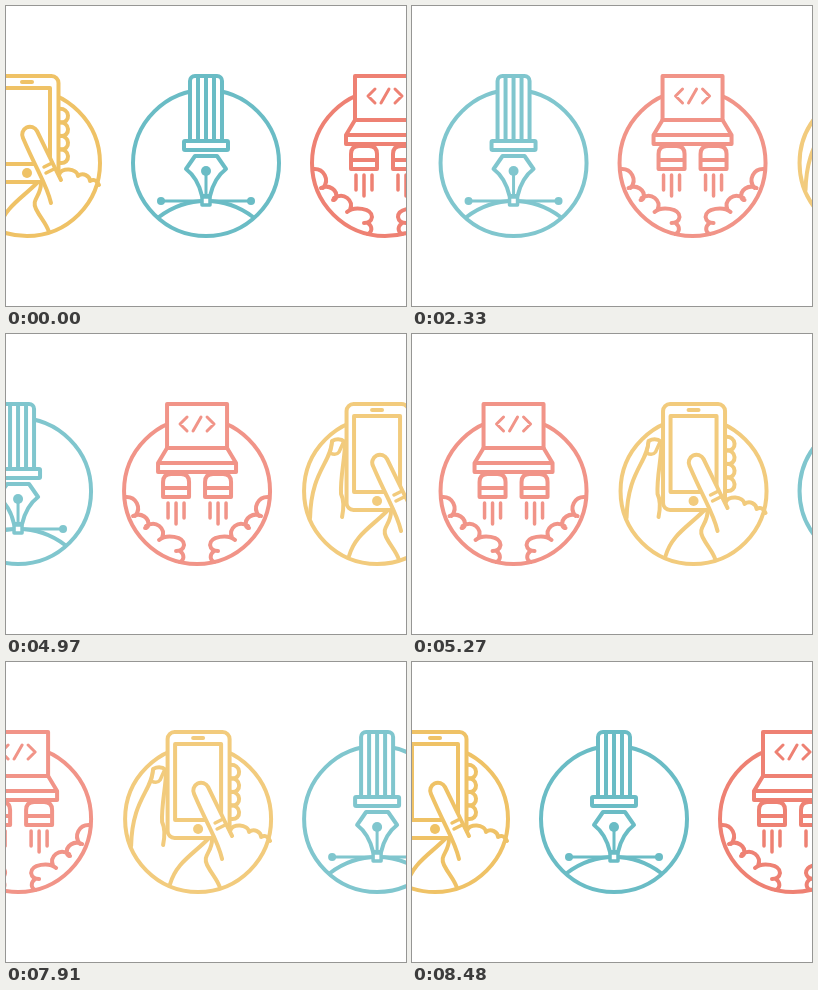
An HTML page with a canvas that plays this animation: 400x300 px, repeating every 8.81 s.

```html
<!DOCTYPE html>
<html>
<head>
<meta charset="utf-8">
<title>Icon carousel</title>
<style>
html, body { margin: 0; width: 100%; height: 100%; overflow: hidden; background: #fff; }
canvas { display: block; width: 400px; height: 300px; }
</style>
</head>
<body>
<canvas id="stage" width="400" height="300"></canvas>
<script>
const ctx = document.getElementById('stage').getContext('2d');
const YELLOW = '#efc266', BLUE = '#6abcc5', RED = '#ee8173';
const LOOP = 8810, FRAME = 30, STEPS = 20, FADE = 0.85;

// Icon coordinates are relative to the centre of the ring.
function line(d, width = 4, fill) {
  const path = new Path2D(d);
  if (fill) { ctx.fillStyle = '#fff'; ctx.fill(path); }
  ctx.lineWidth = width;
  ctx.stroke(path);
}

function box(x, y, w, h, r = 0) {
  ctx.beginPath();
  ctx.roundRect(x, y, w, h, r);
  ctx.fillStyle = '#fff';
  ctx.fill();
  ctx.lineWidth = 4;
  ctx.stroke();
}

function dot(x, y, r) {
  ctx.beginPath();
  ctx.arc(x, y, r, 0, Math.PI * 2);
  ctx.fillStyle = ctx.strokeStyle;
  ctx.fill();
}

function ring() {
  ctx.beginPath();
  ctx.arc(0, 0, 73, 0, Math.PI * 2);
  ctx.lineWidth = 4;
  ctx.stroke();
}

function mirrored(draw) {
  draw();
  ctx.save();
  ctx.scale(-1, 1);
  draw();
  ctx.restore();
}

function pen() {
  box(-16, -87, 32, 67, [5, 5, 0, 0]);
  line('M-8-87V-22M0-87V-22M8-87V-22');
  box(-22, -22, 44, 9, 1);
  line('M-47 54Q-26 38 0 38T47 54');
  line('M-45 38H45', 3);
  dot(-45, 38, 4);
  dot(45, 38, 4);
  line('M-11-7H11L20 6C12 12 7 20 4 33H-4C-7 20-12 12-20 6Z', 4, true);
  line('M0 8V34', 3);
  dot(0, 8, 5);
  ctx.lineWidth = 3;
  line('M-4 34H4V42H-4Z', 3.5, true);
}

function rocketLaptop() {
  mirrored(() => {
    line('M-34 6V-9Q-34-17-26-17H-16Q-8-17-8-9V6ZM-34-3H-8');
    line('M-29 12V27M-21 12V33M-13 12V27', 3.5);
    line('M-72 6C-61 5-55 17-62 25M-64 25C-56 21-47 27-49 35Q-50 37-52 37' +
      'M-51 35C-41 29-31 37-35 47M-38 49C-31 43-13 45-13 54Q-14 60-21 60' +
      'M-17 60C-12 64-13 69-17 71');
  });
  box(-30, -87, 60, 46);
  line('M-30-43H30L39-28V-19H-39V-28ZM-39-28H39', 4, true);
  line('M-10-74L-17-67L-10-60M10-74L17-67L10-60M4-74L-4-60', 3);
}

function phoneHand() {
  line('M-67 27C-66-20-46-28-45-50Q-38-54-32-49C-32-32-37-14-36 3Q-32 11-35 26');
  line('M-45-49L-47-38Q-41-35-38-39L-34-48', 3.5);
  for (let i = 0; i < 4; i++) {
    const y = -54 + i * 13.5;
    line(`M31 ${y}C44 ${y - 2} 44 ${y + 15} 33 ${y + 13.5}`);
  }
  line('M-28 65C-22 44-6 36 10 20');
  box(-30.5, -87, 62, 106, 7);
  box(-23, -75, 46, 76);
  line('M-5-81H5');
  dot(0, 10, 5);
  ctx.fillStyle = '#fff';
  ctx.fill(new Path2D('M-5-26L10-32L28 4L34 14Q38 4 50 8L66 20L50 48L22 65L8 44L16 22Z'));
  line('M24 40C20 22 11 10-4-25A7.5 7.5 0 0 1 10-32L27 3L34 17');
  line('M17 4L25 0M19 10L27 6', 3.5);
  line('M32 12C34 4 50 5 51 13C56 9 63 13 63 18Q69 15 72 22');
  line('M14 20C14 34 4 36 9 46C14 56 19 60 22 69');
}

const strip = [
  [21, YELLOW, phoneHand], [200, BLUE, pen], [379, RED, rocketLaptop],
  [559, YELLOW, phoneHand], [738, BLUE, pen], [917, RED, rocketLaptop]
];
const starts = [2030, 4970, 7910];
const stops = [0, 179, 358, 536];

function pose(t) {
  let shift = 0, moving = false;
  starts.forEach((start, i) => {
    if (t < start) return;
    const step = Math.min(STEPS, Math.floor((t - start) / FRAME) + 1);
    shift = stops[i] + (stops[i + 1] - stops[i]) * step / STEPS;
    moving = step < STEPS;
  });
  return { shift, alpha: moving ? FADE : 1 };
}

function render(t) {
  const { shift, alpha } = pose(t);
  ctx.fillStyle = '#fff';
  ctx.fillRect(0, 0, 400, 300);
  ctx.lineJoin = 'round';
  ctx.lineCap = 'round';
  for (const [x, color, icon] of strip) {
    const cx = x - shift;
    if (cx < -80 || cx > 480) continue;
    ctx.save();
    ctx.translate(cx, 157);
    ctx.strokeStyle = color;
    ring();
    icon();
    ctx.restore();
  }
  // A white veil lightens the whole strip while it slides.
  if (alpha < 1) {
    ctx.fillStyle = `rgba(255,255,255,${1 - alpha})`;
    ctx.fillRect(0, 0, 400, 300);
  }
}

const begin = performance.now();
function tick() {
  render((performance.now() - begin) % LOOP);
  requestAnimationFrame(tick);
}
render(0);
requestAnimationFrame(tick);
</script>
</body>
</html>
```
